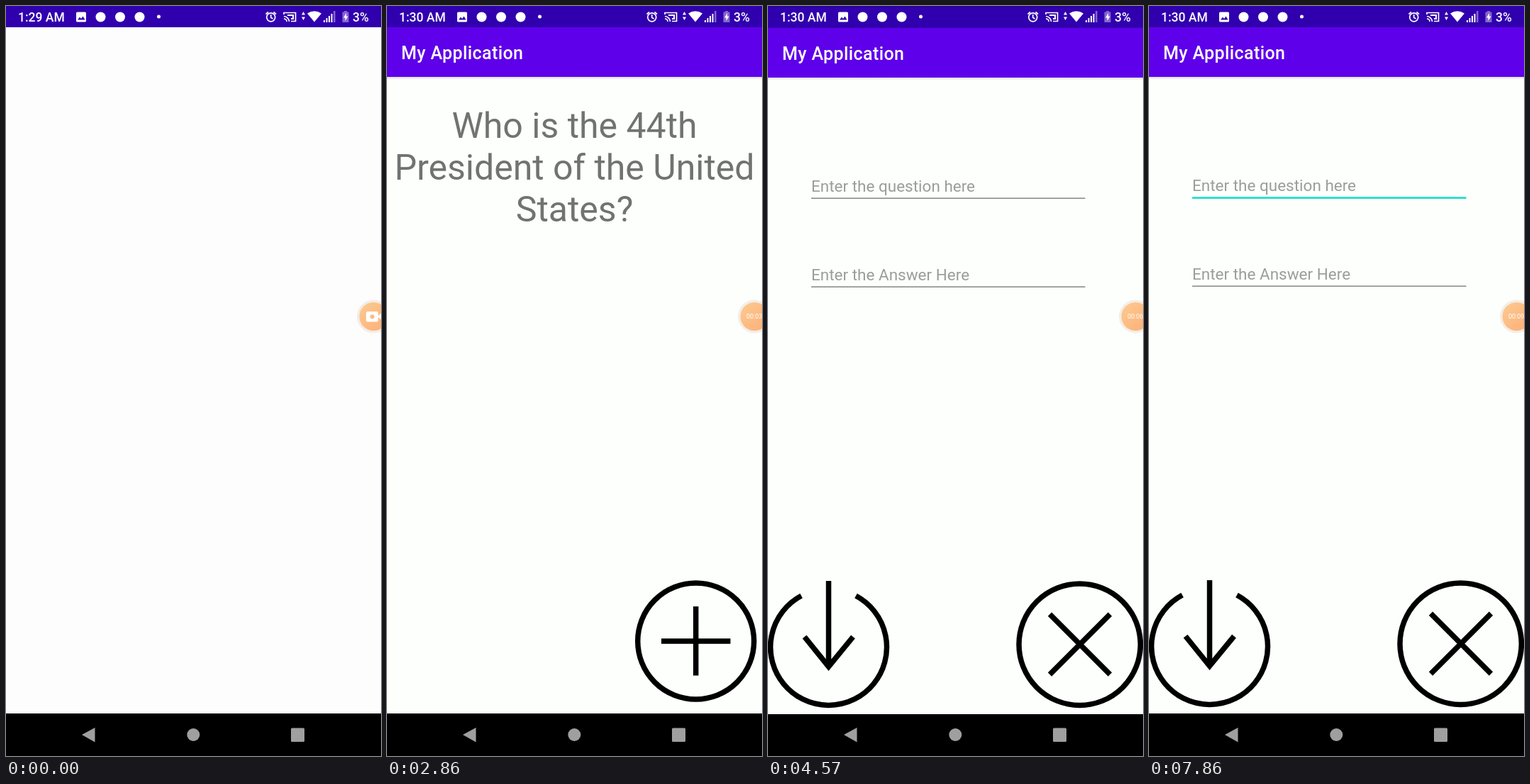
Recreate the animation shown at these times as an HTML page. Size 529 by 1058 pixels, loop 8 s.

```html
<!DOCTYPE html>
<html lang="en">
<head>
<meta charset="utf-8">
<title>Flashcard app</title>
<style>
  html, body { margin: 0; width: 100%; height: 100%; overflow: hidden; background: #000; }
  svg { display: block; width: 529px; height: 1058px; font-family: Roboto, sans-serif; }
  .title { font-size: 25px; font-weight: 500; letter-spacing: .4px; fill: #fff; }
  .card { font-size: 50px; fill: #717371; text-anchor: middle; }
  .hint { font-size: 22.5px; fill: #9b9d9b; }
  .status { font-size: 17.5px; font-weight: 500; fill: #fff; }
  .ink { fill: none; stroke: #000; stroke-width: 7.5; }
  .line { fill: none; stroke: #fff; stroke-width: 1.7; }
</style>
</head>
<body>
<svg viewBox="0 0 529 1058">
  <defs>
    <linearGradient id="orange" x1="0" y1="0" x2="1" y2="1">
      <stop offset="0" stop-color="#fccb90"/><stop offset="1" stop-color="#fdae78"/>
    </linearGradient>
    <linearGradient id="shade" x1="0" y1="0" x2="0" y2="1">
      <stop offset="0" stop-color="#dcdddf"/><stop offset="1" stop-color="#fdfffd"/>
    </linearGradient>
    <clipPath id="reveal"><rect id="revealBox" width="529" height="1058"/></clipPath>
    <g id="appBar">
      <rect y="30" width="529" height="70" fill="#5e00ea"/>
      <rect y="100" width="529" height="4" fill="url(#shade)"/>
      <text class="title" x="20" y="75">My Application</text>
    </g>
  </defs>

  <rect width="529" height="1058"/>
  <g fill="#9f9f9f">
    <path d="M107 1028L125.500 1018V1038.500Z"/>
    <circle cx="264.300" cy="1028" r="9"/>
    <rect x="402" y="1018.500" width="19" height="19.500" rx="1.500"/>
  </g>

  <g id="home">
    <rect width="529" height="998" fill="#3100ae"/>
    <rect id="paper" y="30" width="529" height="968"/>
    <g id="question">
      <use href="#appBar"/>
      <g class="card">
        <text x="264.500" y="186">Who is the 44th</text>
        <text x="264.500" y="245">President of the United</text>
        <text x="264.500" y="304">States?</text>
      </g>
      <g class="ink">
        <circle cx="435.700" cy="896" r="82"/>
        <path d="M387 896H484.500M435.700 847V944.500"/>
      </g>
    </g>
  </g>
  <rect id="dim" width="529" height="998" opacity=".11"/>

  <g id="form"><g clip-path="url(#reveal)">
    <rect width="529" height="998" fill="#3100ae"/>
    <rect y="30" width="529" height="968" fill="#fdfffd"/>
    <use href="#appBar"/>
    <text class="hint" x="61" y="261">Enter the question here</text>
    <text class="hint" x="61" y="386">Enter the Answer Here</text>
    <rect id="underline" x="61" width="386.500"/>
    <rect x="61" y="394.500" width="386.500" height="1.500" fill="#858785"/>
    <rect id="caret" x="61" y="237" width="2.500" height="30" fill="#17dcc4"/>
    <g class="ink">
      <path d="M47 831A82 82 0 1 0 124 831M85.500 810V931M51.500 889L85.500 931L120 889"/>
      <circle cx="439.700" cy="899.700" r="85.700"/>
      <path d="M397.500 857L482.500 942M482.500 857L397.500 942"/>
    </g>
  </g></g>

  <g class="status">
    <text id="clock" x="17" y="22"></text>
    <text x="489" y="22">3%</text>
  </g>
  <g fill="#fff">
    <rect x="99" y="8.500" width="14" height="14" rx="1.500"/>
    <path d="M101 19.500L104 15.500L106 18L108.500 14.500L111.500 19.500Z" fill="#3100ae"/>
    <circle cx="133.500" cy="15.500" r="7"/>
    <circle cx="161" cy="15.500" r="7"/>
    <circle cx="188.500" cy="15.500" r="7"/>
    <circle cx="215.500" cy="15" r="2.500"/>
    <path d="M417 12.500L419.500 8L422 12.500ZM417 15.500H422L419.500 20Z"/>
    <path d="M425 10.500Q435 4 445 10.500L435 22.500Z"/>
    <path d="M448 20H450V23H448ZM451.500 17H453.500V23H451.500ZM455 14H457V23H455ZM458.500 11H460.500V23H458.500Z"/>
    <path d="M462 7H464.500V23H462Z" opacity=".4"/>
    <path d="M474.500 8.500H477V7H481V8.500H483.500V23H474.500Z" opacity=".4"/>
    <path d="M480 10L476 16.500H478.500V21L482.500 14.500H480Z"/>
  </g>
  <g class="line">
    <circle cx="373.700" cy="15.800" r="6"/>
    <path d="M373.700 12V16.300L376.500 18M366.500 11.500L370 8.500M381 11.500L377.500 8.500"/>
    <path d="M392 12V9.500H408.500V21.500H402M392 14.500A8 8 0 0 1 399.500 22M392 18A4 4 0 0 1 396 22"/>
    <path d="M397 13H405V18H402" stroke-width="2"/>
  </g>

  <circle cx="518.500" cy="438" r="23.500" fill="#f3e9e2" opacity=".8"/>
  <circle cx="518.500" cy="438" r="20" fill="url(#orange)"/>
  <g id="camera" fill="#fff">
    <rect x="508" y="431" width="17" height="14.500" rx="2"/>
    <path d="M524 438L529 433.500V442.500Z"/>
    <circle cx="516.700" cy="438.200" r="3" fill="#fcbc82"/>
  </g>
  <text id="counter" x="507" y="441.300" font-size="9" fill="#fff"></text>
</svg>

<script>
const LOOP = 8000, FPS = 7;
const OPEN = 2280, SLIDE = 4362.5, SLIDE_MS = 425, FOCUS = 4990, BLINK = 500;
const TICKS = [560, 1560, 3280, 3850, 4560, 5560, 6700, 7700];   // seconds 2 to 9

const $ = id => document.getElementById(id);
const set = (id, attrs) => {
  for (const name in attrs) $(id).setAttribute(name, attrs[name]);
};
const show = (id, on) => set(id, { display: on ? "inline" : "none" });

function draw(t) {
  show("question", t >= OPEN);
  $("clock").textContent = t < OPEN ? "1:29 AM" : "1:30 AM";
  set("paper", { fill: t < 140 ? "#fdfdfd" : "#fdfffd" });

  const ticks = TICKS.filter(at => t >= at).length;
  show("camera", !ticks);
  $("counter").textContent = ticks ? "00:0" + (ticks + 1) : "";

  // The form rises and unclips upward while the question drifts up behind it.
  const u = Math.min(1, Math.max(0, (t - SLIDE) / SLIDE_MS));
  const p = u < 1 ? u ** 4 / (u ** 4 + .00135) : 1;
  set("home", { transform: `translate(0 ${-20 * p})` });
  set("form", { transform: `translate(0 ${43.4 * (1 - p)})` });
  set("revealBox", { y: 1058 * (1 - u) ** 10 });
  show("form", u > 0);
  show("dim", u > 0 && u < 1);

  const focused = t >= FOCUS;
  set("underline", focused
    ? { y: 269.3, height: 2.6, fill: "#17dcc4" }
    : { y: 269.5, height: 1.5, fill: "#858785" });
  show("caret", focused && Math.floor((t - FOCUS) / BLINK) % 2 === 0);
}

function tick(now) {
  const t = now % LOOP;
  draw(Math.floor((t + 5) * FPS / 1000) * 1000 / FPS);   // stepped like a screen capture
  requestAnimationFrame(tick);
}
draw(0);
requestAnimationFrame(tick);
</script>
</body>
</html>
```
